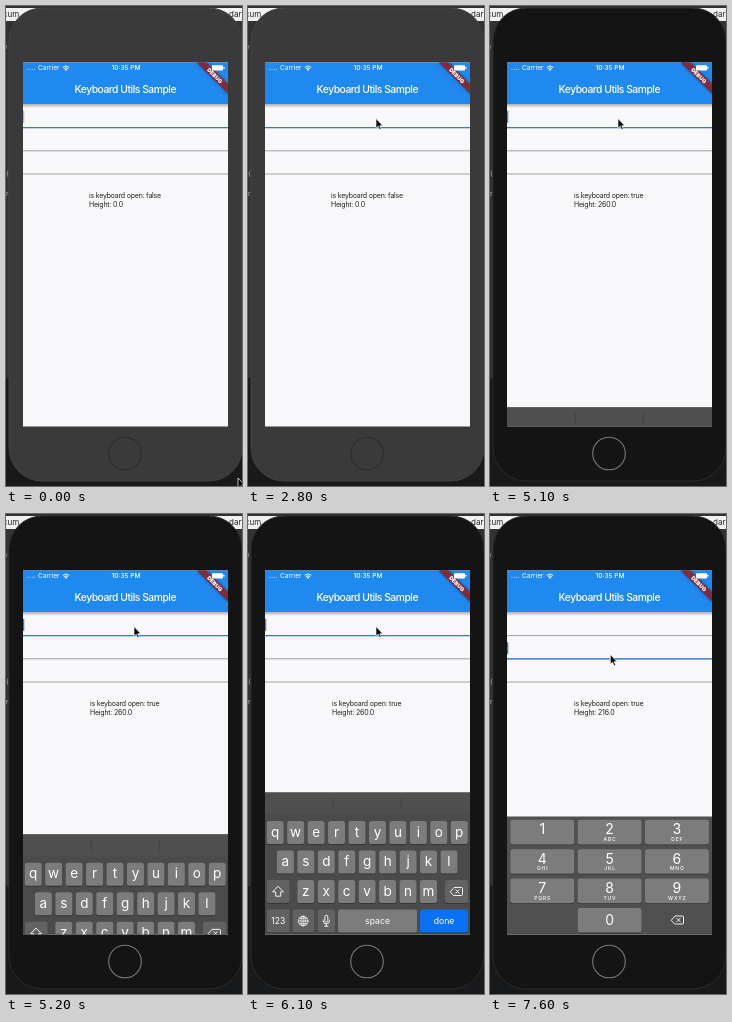
These frames come from a looping animation (236x480 px, 8 s). An HTML page:

```html
<!DOCTYPE html>
<html lang="en">
<head>
<meta charset="utf-8">
<title>Keyboard Utils Sample</title>
<style>
html, body { margin: 0; width: 100%; height: 100%; overflow: hidden; background: #18191b; }
svg { display: block; width: 100vw; height: 100vh; }
text { font-family: Inter, "Liberation Sans", sans-serif; fill: #fff; }
.mid { text-anchor: middle; }
.label { font-size: 7px; letter-spacing: -.21px; fill: #222; }
.icon { fill: none; stroke: #fff; stroke-width: .9; stroke-linejoin: round; stroke-linecap: round; }
</style>
</head>
<body>
<svg viewBox="0 0 236 480">
  <defs>
    <clipPath id="screen"><rect x="17" y="56.5" width="205" height="364"/></clipPath>
    <filter id="blur" x="-50%" y="-100%" width="200%" height="300%"><feGaussianBlur stdDeviation="1.5"/></filter>
    <linearGradient id="shade" x2="0" y2="1">
      <stop stop-color="#000" stop-opacity=".3"/><stop offset="1" stop-color="#000" stop-opacity="0"/>
    </linearGradient>
    <g id="erase" class="icon"><path d="M-6 0L-2.5-4H5Q6-4 6-3V3Q6 4 5 4H-2.5ZM-.7-1.7L2.7 1.7M2.7-1.7L-.7 1.7"/></g>
  </defs>

  <!-- desktop behind the simulator -->
  <rect width="236" height="480" fill="#18191b"/>
  <rect width="236" height="372" fill="#303234"/>
  <rect y="2" width="236" height="13" fill="#f1f1f1"/>
  <g font-size="8"><text x="-3" y="11" style="fill:#222">cum</text><text x="223" y="11" style="fill:#222">dar</text></g>
  <g font-size="7" opacity=".6"><text x="-1" y="44">/</text><text x="0" y="170">{</text><text x="0" y="190">r</text></g>

  <rect id="body" x="3" y="2" width="233" height="473" rx="33" stroke-width="1"/>
  <circle id="home" cx="119" cy="447.5" r="16.3" fill="none" stroke-width="1.1"/>

  <g clip-path="url(#screen)">
    <rect x="17" y="56" width="205" height="365" fill="#f8f7f9"/>
    <rect x="17" y="98" width="205" height="4" fill="url(#shade)"/>
    <rect x="17" y="56" width="205" height="42" fill="#2089f0"/>
    <text class="mid" x="119.3" y="86.7" font-size="10.3" font-weight="500" letter-spacing="-.46">Keyboard Utils Sample</text>
    <g id="lines"></g>
    <rect id="caret" x="17" width="1.3" height="12" fill="#3f78b5"/>
    <text id="state" class="label" y="191.8"></text>
    <text id="height" class="label" y="200.8"></text>

    <g transform="translate(222 56.5) rotate(45)">
      <rect x="-22" y="15.3" width="44" height="6.6" opacity=".5" filter="url(#blur)"/>
      <rect x="-22" y="15.3" width="44" height="6.6" fill="#842a36"/>
      <text class="mid" y="20.6" font-size="5.5" font-weight="900">DEBUG</text>
    </g>

    <g fill="#fff">
      <path d="M21.3 63.4h8" stroke="#fff" stroke-dasharray=".9 1.4" opacity=".7"/>
      <text x="32" y="64.2" font-size="6.6">Carrier</text>
      <path d="M60 65l-1.3-1.5q1.3-1 2.6 0z"/>
      <path d="M56.7 61.3q3.3-2.7 6.6 0M57.8 62.7q2.2-1.7 4.4 0" fill="none" stroke="#fff" stroke-width=".9"/>
      <text class="mid" x="120" y="64.2" font-size="6.6" font-weight="500">10:35 PM</text>
      <rect x="206" y="59.2" width="11" height="5.2" rx="1"/>
      <rect x="217.5" y="60.8" width=".9" height="2" rx=".4"/>
    </g>

    <g id="letters">
      <rect x="17" y="278.5" width="205" height="150" fill="#4b4b4b"/>
      <rect x="17" y="278.5" width="205" height="22" fill="#4f4f4f"/>
      <path d="M85.3 284v11M153.3 284v11" stroke="#414141" stroke-width=".8"/>
    </g>
    <g id="digits"><rect x="17" y="302.5" width="205" height="120" fill="#505050"/></g>
  </g>

  <circle id="touch" r="7" fill="#aaa" opacity=".5"/>
  <path id="pointer" d="M0 0V9.7L2.2 7.7 3.8 11.3 5.3 10.6 3.8 7.2H6.8Z" stroke="#fff" stroke-width=".7"/>
</svg>
<script>
const $ = id => document.getElementById(id);
const add = (id, markup) => $(id).insertAdjacentHTML('beforeend', markup);
const clamp = x => Math.max(0, Math.min(1, x));
const span = (t, a, b) => clamp((t - a) / (b - a));
const mix = (a, b, p) => a + (b - a) * p;

function key(id, x, y, w, h, fill, label = '', size = 13, dy = size * .33) {
  add(id, `<rect x="${x}" y="${y + .8}" width="${w}" height="${h}" rx="2.6" fill="#303030"/>
    <rect x="${x}" y="${y}" width="${w}" height="${h}" rx="2.6" fill="${fill}"/>
    <text class="mid" x="${x + w / 2}" y="${y + h / 2 + dy}" font-size="${size}">${label}</text>`);
}

const LIGHT = '#7c7c7c', DIM = '#626262';
[['qwertyuiop', 18.7], ['asdfghjkl', 28.9], ['zxcvbnm', 49.3]].forEach(([row, x], r) =>
  [...row].forEach((c, i) => key('letters', x + i * 20.45, 307 + r * 29.5, 17, 23, LIGHT, c, 13.5, 4)));
key('letters', 18.7, 366, 23, 23, DIM);
key('letters', 197, 366, 23, 23, DIM);
key('letters', 18.7, 395.5, 23, 23, DIM, '123', 8.5);
key('letters', 44.5, 395.5, 21.5, 23, DIM);
key('letters', 69.5, 395.5, 17.5, 23, DIM);
key('letters', 90, 395.5, 79, 23, LIGHT, 'space', 8.7);
key('letters', 172, 395.5, 48, 23, '#0a70f5', 'done', 8.7);
add('letters', `<use href="#erase" x="208.5" y="377.5"/>
  <g class="icon">
    <path d="M30.2 372.5l5.2 5.4h-2.7v4.3h-5v-4.3H25z"/>
    <g stroke-width=".7"><circle cx="55.2" cy="407" r="4.8"/><ellipse cx="55.2" cy="407" rx="2.2" ry="4.8"/>
    <path d="M50.4 407h9.6M55.2 402.2v9.6M51.4 404.2h7.6M51.4 409.8h7.6"/></g>
    <rect x="76.8" y="401.3" width="3" height="6.8" rx="1.5"/>
    <path d="M75.2 406v.8a3.1 3 0 0 0 6.2 0v-.8M78.3 409.8v2.4M76.6 412.2h3.4"/>
  </g>`);

['', 'ABC', 'DEF', 'GHI', 'JKL', 'MNO', 'PQRS', 'TUV', 'WXYZ'].forEach((sub, i) => {
  const x = 20.3 + i % 3 * 67.3, y = 305.8 + Math.floor(i / 3) * 29.4;
  key('digits', x, y, 64, 24.6, LIGHT, i + 1, 14, 2);
  add('digits', `<text class="mid" x="${x + 32.4}" y="${y + 21.2}" font-size="5" font-weight="500" letter-spacing=".8">${sub}</text>`);
});
key('digits', 87.6, 394, 64, 24.6, LIGHT, 0, 14, 5);
add('digits', '<use href="#erase" x="187.5" y="406"/>');

const lineY = [121.6, 144.8, 168];
lineY.forEach(y => add('lines',
  `<path d="M17 ${y}h205" stroke="#8d8d8f" stroke-width=".8"/><path d="M17 ${y}h205" stroke="#2c7fd0" stroke-width="1.3"/>`));
const focus = $('lines').querySelectorAll('path:nth-child(even)');

const WAKE = 3000, OPEN = 5066, SWITCH = 7300;

// fades in and out once a second
function blink(t) {
  const p = (t + 120) % 1000;
  return p < 500 ? clamp(p / 250) : 1 - clamp((p - 500) / 220);
}

// critically damped spring, 0 to 1
function spring(ms) {
  const x = Math.max(0, ms) * .01825;
  return 1 - (1 + x) * Math.exp(-x);
}

function set(id, attrs) {
  for (const k in attrs) $(id).setAttribute(k, attrs[k]);
}

function draw(t) {
  const awake = t >= WAKE, open = t >= OPEN, second = t >= SWITCH;
  set('body', { fill: awake ? '#141414' : '#3a3a3a', stroke: awake ? '#2b2b2b' : '#424242' });
  set('home', { stroke: awake ? '#777' : '#2b2b2b' });

  const swap = span(t, SWITCH - 50, SWITCH + 150);
  focus[0].style.opacity = 1 - swap;
  focus[1].style.opacity = swap;
  focus[2].style.opacity = 0;
  set('caret', { y: second ? 128.2 : 104.8, opacity: second ? 1 : blink(t) });

  $('state').textContent = 'is keyboard open: ' + open;
  $('height').textContent = 'Height: ' + (second ? '216.0' : open ? '260.0' : '0.0');
  set('state', { x: open ? 84 : 83 });
  set('height', { x: open ? 84 : 83 });

  set('letters', { transform: `translate(0 ${142 * (1 - spring(t - OPEN))})`, visibility: open && !second ? 'visible' : 'hidden' });
  set('digits', { visibility: second ? 'visible' : 'hidden' });

  const arrive = 1 - (1 - span(t, 50, 1850)) ** 3;
  const q = span(t, 6600, 7130), shift = q * q * (3 - 2 * q);
  const x = mix(mix(232, 128, arrive), 120.3, shift);
  const y = mix(mix(472, 112.5, arrive), 140.5, shift);
  set('pointer', { transform: `translate(${x} ${y})` });
  const pressed = t >= 4900 && t < 5050 || t >= 7150 && t < SWITCH;
  set('touch', { cx: x, cy: y + .5, visibility: pressed ? 'visible' : 'hidden' });
}

const start = performance.now();
function tick() {
  draw((performance.now() - start) % 8000);
  requestAnimationFrame(tick);
}
tick();
</script>
</body>
</html>
```
